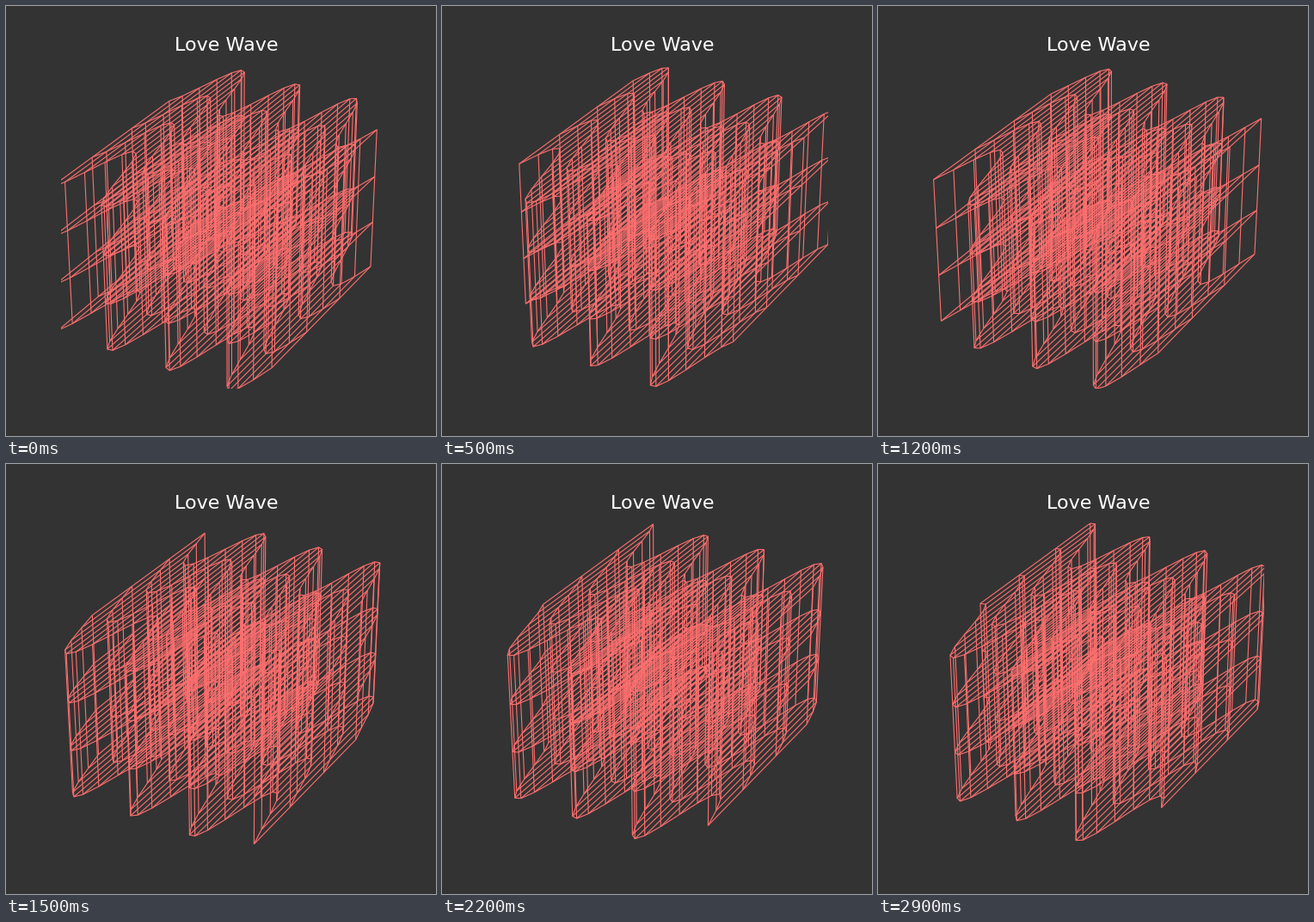
Recreate the animation shown at these times as a matplotlib script. Size 500 by 500 pixels, loop 3000 ms.

```python
import numpy as np
import matplotlib.pyplot as plt
from matplotlib.animation import FuncAnimation
from mpl_toolkits.mplot3d.art3d import Line3DCollection

FRAMES, INTERVAL = 30, 100
BACKGROUND, LINE = "#333333", "#ff6f6f"
AMPLITUDE = 5

# Lattice of points, indexed by (x, y, z)
X, Y, Z = np.meshgrid(
    np.linspace(-20, 0, 40),
    np.linspace(-10, 10, 4),
    np.linspace(-10, 10, 4),
    indexing="ij",
)

fig = plt.figure(figsize=(5, 5), dpi=100, facecolor=BACKGROUND)
ax = fig.add_subplot(projection="3d", facecolor=BACKGROUND)
ax.set_axis_off()
ax.set_title("Love Wave", color="white", fontsize=16)


def lattice_lines(t):
    """Lines along the wave, and the straight lines across it."""
    shifted = Y + AMPLITUDE * np.sin(X - t)
    points = np.stack([X, shifted, Z], axis=-1)
    along = points.transpose(1, 2, 0, 3).reshape(-1, 40, 3)
    sideways = points.transpose(0, 2, 1, 3).reshape(-1, 4, 3)
    upright = points.reshape(-1, 4, 3)
    return along, np.concatenate([sideways, upright])


meshes = [
    ax.add_collection3d(Line3DCollection(lines, colors=LINE, linewidths=0.8))
    for lines in lattice_lines(0)
]
ax.set(xlim=(-20, 0), ylim=(-10, 10), zlim=(-10, 10))


def update(frame):
    for mesh, lines in zip(meshes, lattice_lines(frame)):
        mesh.set_segments(lines)
    return meshes


anim = FuncAnimation(fig, update, frames=FRAMES, interval=INTERVAL,
                     repeat=True, repeat_delay=0, blit=False)
plt.show()
```
